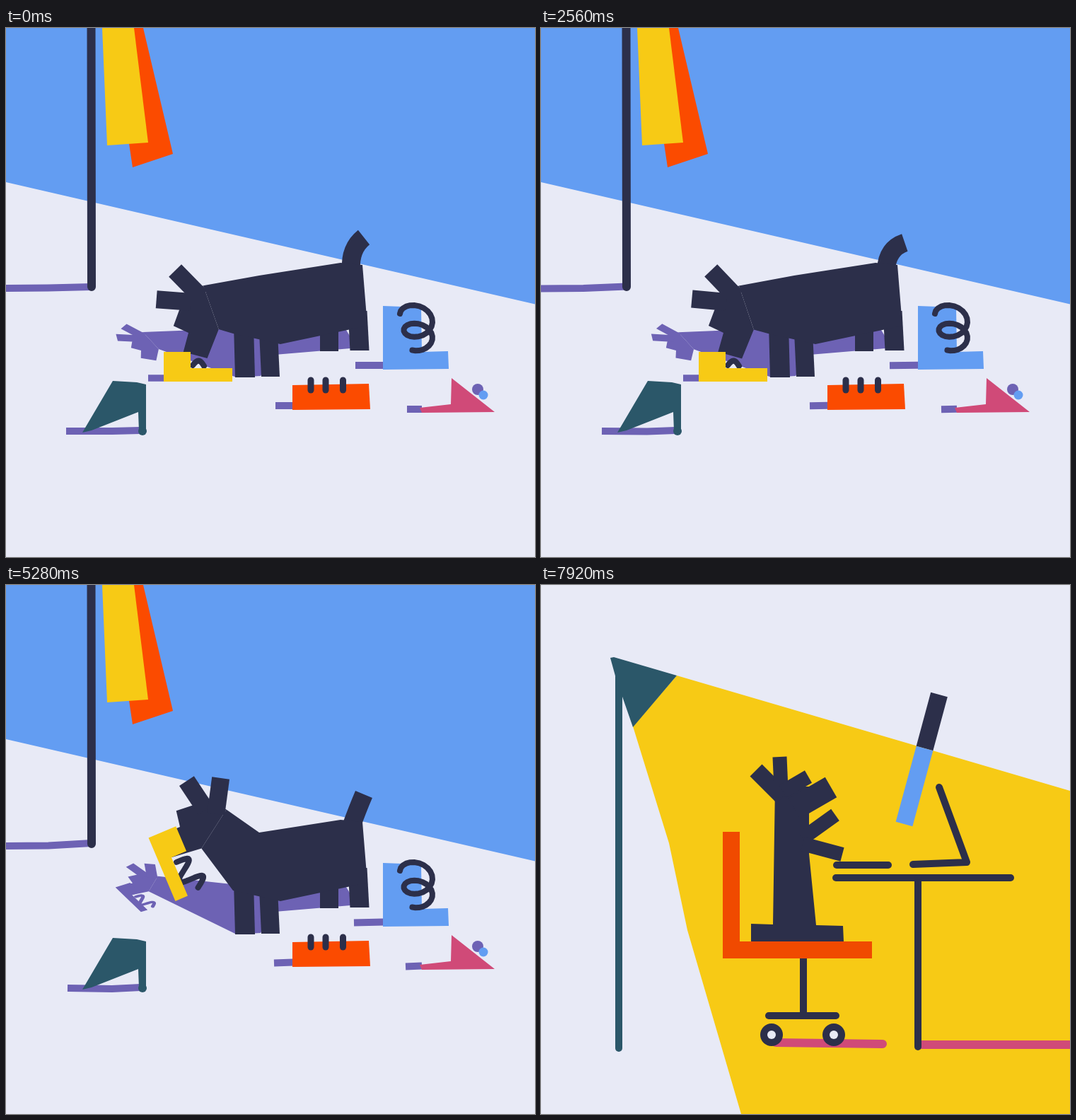
An HTML page with a canvas for the animation above (8000 ms loop, 748 by 748 pixels).

```html
<!DOCTYPE html>
<html lang="en">
<head>
<meta charset="utf-8">
<title>Busy dog</title>
<style>
html, body { margin: 0; width: 100%; height: 100%; overflow: hidden; background: #e8eaf6; }
canvas { display: block; width: 100vmin; height: 100vmin; }
</style>
</head>
<body>
<canvas id="stage" width="748" height="748"></canvas>
<script>
const ctx = document.getElementById('stage').getContext('2d');
const LOOP = 8000, STEP = 80, DESK = 5600, OFFICE = 7520, TAU = Math.PI * 2;
const INK = '#2c2f4a', PAPER = '#e8eaf6', SKY = '#639df2', YELLOW = '#f7ca15',
  ORANGE = '#fb4b00', RUST = '#f04a00', PURPLE = '#6d62b4', TEAL = '#2b5769', PINK = '#d04a78';

// helpers: points are flat lists x, y, x, y
const clamp = v => Math.min(1, Math.max(0, v));
const ramp = (t, from, to) => {
  const k = clamp((t - from) / (to - from));
  return k * k * (3 - 2 * k);
};
const mix = (a, b, k) => a.map((v, i) => v + (b[i] - v) * k);
const swing = (t, period) => (1 - Math.cos(t / period * TAU)) / 2;

function trace(p) {
  ctx.beginPath();
  for (let i = 0; i < p.length; i += 2) ctx.lineTo(p[i], p[i + 1]);
}
function poly(color, ...p) {
  trace(p);
  ctx.fillStyle = color;
  ctx.fill();
}
function stroke(color, width, cap) {
  ctx.lineCap = cap;
  ctx.strokeStyle = color;
  ctx.lineWidth = width;
  ctx.stroke();
}
function line(color, width, ...p) {
  trace(p);
  stroke(color, width, 'round');
}
function bar(color, width, ...p) {
  trace(p);
  stroke(color, width, 'butt');
}
function dot(color, x, y, r) {
  ctx.beginPath();
  ctx.arc(x, y, r, 0, TAU);
  ctx.fillStyle = color;
  ctx.fill();
}
function plot(color, width, point) {
  const p = [];
  for (let i = 0; i <= 40; i++) p.push(...point(i / 40));
  line(color, width, ...p);
}
// a sine wave laid along a straight line
function squiggle(color, width, x0, y0, x1, y1, amp, waves) {
  const dx = x1 - x0, dy = y1 - y0, len = Math.hypot(dx, dy);
  plot(color, width, s => {
    const h = amp * Math.sin(s * waves * TAU) / len;
    return [x0 + dx * s + dy * h, y0 + dy * s - dx * h];
  });
}
function placed(x, y, angle, draw) {
  ctx.save();
  ctx.translate(x, y);
  ctx.rotate(angle);
  draw();
  ctx.restore();
}

// ---- street ----
// head x, y, degrees, then how far the dog leans back
const DOWN = [258, 431, -75, 0], SIDE = [246, 342, -23, 0], LEAN = [361, 310, 7, 1];
const moves = [[3040, 3360, SIDE], [3440, 3680, LEAN], [3840, 4160, SIDE]];
const STAND = [358,350, 473,332, 504,335, 511,421, 388,447, 321,432];
const PULL = [424,337, 511,322, 541,332, 524,417, 408,443, 338,425];

function headShape(color, lean) {
  poly(color, -28,0, 0,0, 4,-23, 27,-21, 40,-18, 60,-8, 70,3, 16,40, -28,35);
  bar(color, 25, 43, -8, 34 + 16 * lean, -56 - 3 * lean);
  bar(color, 25, 54, 3, 80 + 5 * lean, -41 + 12 * lean);
}
function yellowShoe(color, lace, grab, lean) {
  const [x0, x1, y1, amp, waves] = mix([41, 57, -22, 7, 0.5], [47, 92, -37, 16 - 5 * lean, 1.5], grab);
  squiggle(lace, 8, x0, -23, x1, y1, amp, waves);
  poly(color, 0,0, 97,0, 97,-19, 38,-19, 38,-42, 0,-42);
}
function leg(width, hx, hy, fx, fy) {
  const w = width / 2;
  poly(INK, hx - w,hy, hx + w,hy, fx + w,fy, fx - w,fy);
}

function streetDog(t) {
  let pose = DOWN;
  for (const [from, to, next] of moves) pose = mix(pose, next, ramp(t, from, to));
  const [x, y, deg, lean] = pose;
  const grab = ramp(t, 3040, 3200), wag = swing(t, 608);
  const angle = (deg + 2 * wag * (1 - grab)) * Math.PI / 180;
  const c = Math.cos(angle), s = Math.sin(angle);
  const at = (u, v) => [x + u * c - v * s, y + u * s + v * c];
  const nape = at(70, 3), chin = at(16, 40);
  const body = mix(STAND, PULL, lean);
  const shoe = mix([223, 500, 0], [...at(-47, -3), angle + Math.PI / 2], grab);
  const foot = [338 + 12 * lean, 494 - 29 * lean];
  const head = color => placed(x, y, angle, () => headShape(color, lean));
  const drawShoe = (color, lace) => placed(...shoe, () => yellowShoe(color, lace, grab, lean));

  // shadow: the same shapes flattened onto the ground
  const flat = v => v * 0.39 + 288;
  const cast = ([px, py]) => [x - 67 + (px - x) * 0.6 + (py - y) * 0.15, flat(py)];
  const ground = [];
  for (let i = 0; i < 10; i += 2) ground.push(body[i] - 4 - 0.15 * (494 - body[i + 1]), flat(body[i + 1]));
  ctx.save();
  ctx.transform(0.6, 0, 0.15, 0.39, 0.4 * x - 67 - 0.15 * y, 288);
  head(PURPLE);
  if (grab > 0.5) drawShoe(PURPLE, PURPLE);
  ctx.restore();
  poly(PURPLE, ...cast(nape), ...ground, 360,492, foot[0] - 12,foot[1], ...cast(chin));
  if (grab < 0.5) bar(PURPLE, 9.5, 201, 495, 225, 495);

  // tail curls while sniffing, stands straight afterwards
  const w = wag * (1 - grab) + 0.5 * swing(t - 5280, 640) * grab * (1 - lean);
  const bend = mix([486 + 9 * w, 312], [497 + 38 * lean, 317 - 5 * lean], grab);
  ctx.beginPath();
  ctx.moveTo(488 + 37 * lean, 342 - 8 * lean);
  ctx.quadraticCurveTo(...bend, 506 + 22 * w + 44 * lean, 296 + 20 * w - 2 * lean);
  stroke(INK, 26, 'butt');

  leg(27, 497 + 17 * lean, 400, 500 + 3 * lean, 456);
  leg(26, 457 + 29 * lean, 410, 457 + 3 * lean, 457);
  leg(26, 371 + 28 * lean, 430, 374 - lean, 493);
  leg(28, 336 + 14 * lean, 420, ...foot);
  poly(INK, ...nape, ...body, ...chin);
  head(INK);
  drawShoe(YELLOW, INK);
}

function street(t) {
  const boil = Math.floor(t / 320) % 3;
  const dx = [0, -2, -1][boil], dy = [0, 1, 0.5][boil];
  const shadow = (x0, x1, y) => bar(PURPLE, 10, x0 + dx, y + dy / 2, x1, y - dy / 2);

  poly(SKY, 0,0, 748,0, 748,390.5, 0,218);
  bar(PURPLE, 10, 0, 368 + dy, 60, 367.5 + dy, 121, 366 - dy);
  poly(ORANGE, 181,0, 194,0, 236,178, 179,197, 172,150);
  poly(YELLOW, 136,0, 181,0, 201,162, 143,166);
  line(INK, 12, 120.5, -8, 121, 366);

  streetDog(t);

  // heeled shoe
  bar(PURPLE, 10, 85 - dx, 570, 150, 570 + dy, 190, 569);
  poly(TEAL, 151,499, 185,501, 198,504, 198,570, 188,570, 187,543, 121,569, 108,572);
  dot(TEAL, 193, 570, 6);

  // trainer
  shadow(381, 406, 534);
  poly(ORANGE, 405,505, 513,503, 515,539, 405,540);
  for (const x of [431, 452, 476.5]) line(INK, 9, x, 498, x, 512);

  // boot with a coiled lace
  shadow(494, 534, 477);
  poly(SKY, 533,393, 587,395, 588,458, 625,457, 626,482, 533,483);
  plot(INK, 8, s => {
    const a = Math.PI * (1 + 3.7 * s), r = 23 - 5 * s;
    return [603 - r + r * Math.cos(a), 404 + 3.6 * (a - Math.PI) + (18 - 6 * s) * Math.sin(a)];
  });

  // slipper
  shadow(567, 588, 539);
  dot(PURPLE, 667, 511, 8);
  dot(SKY, 675, 519, 6.5);
  poly(PINK, 630,495, 691,543, 588,544, 585,537, 629,532);
}

// ---- desk from above ----
// outline runs from the crown round the snout; limbs are two ears, tail, front and hind legs
const REST = {
  outline: [325,282, 372,290, 368,310, 395,319, 385,360, 352,351, 432,481, 443,540, 412,573, 371,560,
    331,491, 297,406, 310,303],
  limbs: [[330,291, 287,276], [346,295, 357,247], [425,492, 470,488], [308,400, 272,476],
    [326,452, 309,508], [426,540, 435,618], [400,561, 355,590]]
};
const SIP = {
  outline: [370,229, 385,209, 408,208, 435,227, 424,248, 412,269, 455,365, 460,420, 415,510, 347,510,
    345,475, 380,355, 367,294],
  limbs: [[370,264, 312,266], [375,268, 333,306], [360,484, 310,503], [438,370, 482,436],
    [440,410, 456,472], [395,510, 424,556], [363,500, 356,570]]
};

function deskDog(color, turn, wag) {
  poly(color, ...mix(REST.outline, SIP.outline, turn));
  REST.limbs.forEach((limb, i) => {
    const p = mix(limb, SIP.limbs[i], turn);
    if (i === 2) p[3] += wag;
    bar(color, i < 3 ? 26 : 31, ...p);
  });
}

function desk(t) {
  poly(YELLOW, 0,0, 748,0, 748,748, 0,748);
  poly(RUST, 400,0, 582,0, 505,47, 274,200);
  poly(SKY, 176,354, 0,640, 0,468);
  poly(INK, 0,0, 400,0, 274,200, 176,354, 0,469);
  poly(RUST, 748,230, 690,342, 610,471, 495,660, 438,748, 748,748);

  for (const [color, x, y] of [[RUST, -4, 6], [PAPER, 0, 0]])
    placed(x, y, 0, () => poly(color, 254,388, 367,510, 277,589, 164,467));
  squiggle(INK, 8, 239, 424, 283, 451, 8, 2);
  dot(INK, 297, 456, 5);
  squiggle(INK, 9, 228, 510, 277, 558, 10, 1.5);

  line(RUST, 11, 155, 517, 186, 547);
  line(INK, 11, 157, 509, 195, 546);
  bar(PAPER, 11, 181, 533, 190, 542);

  const turn = ramp(t, 6480, 6880), wag = 8 * Math.sin((t - 6240) / 480 * TAU) * (1 - turn);
  line(RUST, 41, 385, 209, 374, 219);
  placed(-17, 14, 0, () => deskDog(RUST, turn, wag));
  deskDog(INK, turn, wag);
  line(INK, 9, 407, 192, 412, 189);
  dot(PAPER, 385, 209, 21);
  dot(INK, 385, 209, 12);
}

// ---- office ----
function office(t) {
  poly(YELLOW, 192,128, 748,291, 748,748, 283,748, 207,488, 181,365, 130,200);
  line(TEAL, 10, 110, 130, 110, 655);
  poly(TEAL, 98,103, 103,102, 192,128, 130,201, 106,132);
  line(PINK, 12, 332, 647, 483, 649);
  line(PINK, 12, 538, 650, 760, 650);

  bar(INK, 24.5, 563, 155, 542.5, 231);
  bar(SKY, 24.5, 542.5, 231, 513.5, 338);

  line(INK, 10, 417, 414, 664, 414);
  line(INK, 10, 533, 414, 533, 653);
  line(INK, 10, 418, 396, 491, 396);
  line(INK, 10, 526, 395, 602, 392, 563, 286);

  // dog, paws taking turns on the keys
  const tap = swing(t - 7920, 320) * 36;
  poly(INK, 331,285, 379,285, 379,380, 389,481, 427,482, 428,504, 297,504, 297,479, 328,480);
  bar(INK, 24, 342, 300, 304, 262);
  bar(INK, 20, 340, 300, 337.5, 243);
  bar(INK, 20, 342, 292, 378, 271);
  bar(INK, 33, 358, 316, 410, 286);
  bar(INK, 20, 370, 358, 416, 325 + tap);
  bar(INK, 20, 370, 366, 426, 381 - tap);

  bar(RUST, 24, 269, 349, 269, 516);
  bar(RUST, 24, 257, 516, 468, 516);
  bar(INK, 10, 371, 528, 371, 609);
  line(INK, 10, 322, 609, 417, 609);
  for (const x of [326, 414]) {
    dot(INK, x, 636, 16);
    dot(PAPER, x, 636, 6);
  }
}

function frame() {
  const t = Math.floor(performance.now() % LOOP / STEP) * STEP;
  ctx.lineJoin = 'round';
  poly(PAPER, 0,0, 748,0, 748,748, 0,748);
  (t < DESK ? street : t < OFFICE ? desk : office)(t);
  requestAnimationFrame(frame);
}
frame();
</script>
</body>
</html>
```
